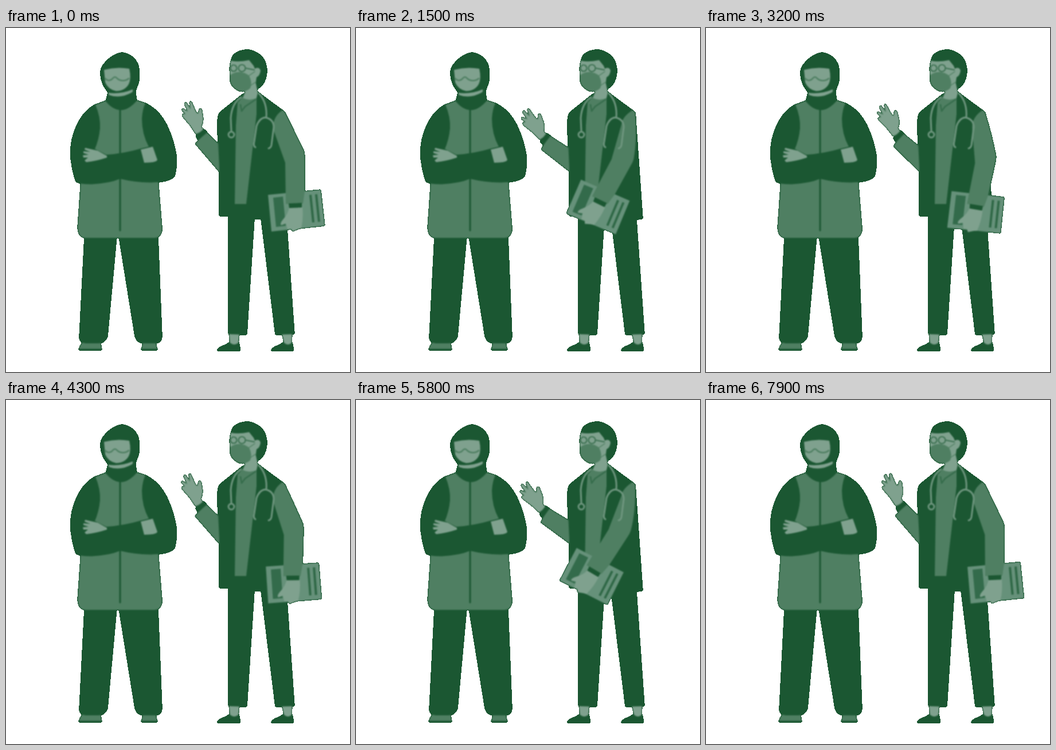
Recreate the animation shown at these times as an HTML page. Size 600x600 px, loop 8 s.

```html
<!DOCTYPE html>
<html lang="en">
<head>
<meta charset="utf-8">
<title>Two people talking</title>
<style>
  html, body { margin: 0; width: 100%; height: 100%; overflow: hidden; background: #fff; }
  svg { display: block; width: 100vw; height: 100vh; }
  .dark { fill: #1b5732; }
  .mid { fill: #4f7f62; }
  .light { fill: #7fa18e; }
  .book { fill: #66917a; }
  .line { fill: none; stroke-linecap: round; stroke-linejoin: round; }
</style>
</head>
<body>
<svg viewBox="0 0 600 600">
  <defs>
    <!-- soft colour edges inside a hard, slightly grown dark outline -->
    <filter id="soft" filterUnits="userSpaceOnUse" x="0" y="0" width="600" height="600" color-interpolation-filters="sRGB">
      <feGaussianBlur in="SourceAlpha" stdDeviation="0.8"/>
      <feComponentTransfer result="shape">
        <feFuncA type="discrete" tableValues="0 1 1 1"/>
      </feComponentTransfer>
      <feGaussianBlur in="SourceGraphic" stdDeviation="1" result="blur"/>
      <feFlood flood-color="#1b5732" result="base"/>
      <feMerge result="mix"><feMergeNode in="base"/><feMergeNode in="blur"/></feMerge>
      <feComposite in="mix" in2="shape" operator="in"/>
    </filter>
  </defs>

  <g filter="url(#soft)">
    <!-- shoes and trousers -->
    <path class="mid" d="M133 549H165L167 561H127Q128 555 133 549ZM239 549H261L264 561H236Z"/>
    <path class="dark" d="M127 559.5H167V562H127ZM236 559.5H264V562H236Z"/>
    <path class="dark" d="M137 364H193L177 538Q173 550 160 550H139Q128 549 128 540Z"/>
    <path class="dark" d="M197 364H265L272 538Q271 550 260 550H240Q228 549 225 538Z"/>
    <!-- coat -->
    <path class="mid" d="M131 262L125 348Q126 366 139 366H259Q273 365 272 348L265 262Z"/>
    <path class="dark" d="M157 133Q135 143 122 173Q108 205 115 241Q118 258 122 268Q130 273 150 272.500Q180 271 199 263Q232 271 262 269Q284 268 294 259Q299 240 297 222Q293 195 280 168Q266 141 243 131L227 126H177Z"/>
    <path class="mid" d="M156 134Q165 155 164 175Q162 195 155 211L175 221Q206 219 236 210L249 207Q237 185 237 158Q238 142 243 131L227 126Q200 159 174 127Z"/>
    <path class="line" d="M199 142V353" stroke="#1b5732" stroke-width="3"/>
    <!-- hands -->
    <path class="light" d="M176 223L160 214L138 209L137 212L147 216L135 215V218L144 221L134 222L135 226L143 226L137 231L140 234Q158 232 176 226Z"/>
    <path class="light" d="M235 212L256 207L264 230Q262 235 241 235Z"/>
    <!-- hood and face -->
    <path class="dark" d="M202 43C216 44 231 55 232 72Q234 90 230 99Q226 107 226 114L228 127Q200 159 174 128L178 112Q166 98 165 82Q164 72 169 65Q183 46 202 43Z"/>
    <path class="light" d="M171 73Q193 67 215 71Q219 88 214 98Q207 110 192 110Q178 107 173 95Z"/>
    <path class="line" d="M173 88C176 92 182 93 186 88Q190 83 194 88C199 93 209 93 214 88" stroke="#4f7f62" stroke-width="2.500"/>
    <path class="light" d="M178 113Q200 116 221 107Q222 110 220 112Q200 124 180 117Z"/>
  </g>

  <g filter="url(#soft)">
    <g id="wave">
      <path class="light" d="M331 185L321 170L310 157Q306 153 308 150L313 150L307 144Q306 140 309 140L317 146L311 133Q312 128 315 130L322 142L320 130Q321 126 324 129L330 143Q333 150 335 149L337 141Q341 139 342 144L344 158Q344 165 341 172L345 179Z"/>
      <path class="mid" d="M330 202L349 181L390 221V272Z"/>
      <path class="dark" d="M331 188L345 176L351 182L335 196Z"/>
    </g>
    <!-- feet -->
    <path class="light" d="M389 532H407L405 553H391ZM481 532H499L498 553H486Z"/>
    <path class="dark" d="M390 548Q398 556 406 548L409 563H368Q369 557 382 553ZM484 548Q492 556 499 548L502 563H462Q464 557 476 553Z"/>
    <!-- vest and trousers -->
    <path class="dark" d="M413 115L440 112L487 147L500 333L489 334L503 534L470 535L445 333H433L420 535L388 534V328H372V240L369 180Q368 152 373 147Z"/>
    <path class="mid" d="M404 130L414 119L437 120L437 150L419 307H399L401 170Z"/>
    <path class="line" d="M409 134L411 145L417 137L435 125" stroke="#356c4b" stroke-width="2.500"/>
    <!-- head -->
    <path class="light" d="M415 104L437 96L439 113L437 122Q425 128 413 122L417 112Z"/>
    <path class="dark" d="M393 58Q392 46 408 40Q425 35 437 43Q453 50 455 73Q455 97 438 107L428 60Z"/>
    <path class="light" d="M392 57Q405 60 424 56Q428 61 432 66L434 71Q441 67 444 74Q443 83 437 86L434 106Q418 112 404 108Q392 100 391 84L390 70Z"/>
    <path class="mid" d="M391 82Q407 71 424 83Q430 95 426 105Q417 113 407 110Q393 104 391 93Z"/>
    <path class="line" d="M424 83L434 76M427 100L436 94" stroke="#4f7f62" stroke-width="1.500"/>
    <g class="line" stroke="#3d7152" stroke-width="2.200">
      <circle cx="397" cy="70" r="5.500"/>
      <circle cx="411.500" cy="70" r="6"/>
      <path d="M418 70L433 73"/>
    </g>
    <!-- carried folder and arm -->
    <g class="carry">
      <path class="book" d="M457 291L549 282L556 345L463 355Z"/>
      <path d="M466 296L483 294L488 345L471 347Z" fill="#336b4b"/>
      <path class="line" d="M531 291L536 339M541 290L546 338" stroke="#2f6846" stroke-width="4" style="stroke-linecap:butt"/>
    </g>
    <path id="arm" class="mid"/>
    <g class="carry">
      <path class="light" d="M494 313L517 312Q519 332 515 349L509 351L500 355L497 350L491 351L488 341L480 344Q477 341 484 333Q492 324 494 313Z"/>
      <path class="dark" d="M493 306L516 305V313L494 314Z"/>
    </g>
    <!-- stethoscope -->
    <g class="line" stroke="#6f967f" stroke-width="3">
      <path d="M410 121Q394 131 392 157L393 180"/>
      <circle cx="393" cy="186" r="5"/>
      <path d="M441 114Q456 130 454 156"/>
      <path d="M435 208Q431 206 433 198L437 171Q442 157 452 156Q467 159 467 173L463 204Q462 209 458 210"/>
    </g>
  </g>
</svg>
<script>
  const LOOP = 8000, STEP = 100, SWING = 4020;
  const shoulder = [477.5, 167.3], elbow = [503, 225];
  const wave = document.getElementById('wave');
  const arm = document.getElementById('arm');
  const carried = document.querySelectorAll('.carry');

  function spin([x, y], [px, py], deg) {
    const a = deg * Math.PI / 180, c = Math.cos(a), s = Math.sin(a);
    return [px + (x - px) * c - (y - py) * s, py + (x - px) * s + (y - py) * c];
  }

  function draw(time) {
    const t = Math.floor(time % LOOP / STEP) * STEP;
    const k = (1 - Math.cos(2 * Math.PI * t / SWING)) / 2;
    const upper = 42 * k, lower = 34 * k;

    const joint = spin(elbow, shoulder, upper);
    const onUpper = (x, y) => spin([x, y], shoulder, upper);
    const onJoint = (dx, dy, deg) => spin([joint[0] + dx, joint[1] + dy], joint, deg);
    const bend = (upper + lower) / 2;

    arm.setAttribute('d', [
      'M', [483, 143], 'L', [487, 148],
      'Q', onUpper(504, 182), onJoint(16, -12, bend),
      'Q', onJoint(18, -7, bend), onJoint(18, 2, lower),
      'L', onJoint(18, 60, lower), onJoint(15, 81, lower), onJoint(-15, 82, lower),
      onJoint(-16, 10, bend), onUpper(466, 176),
      'Q', [465, 154], [483, 143], 'Z'
    ].join(' '));

    const move = `translate(${joint}) rotate(${lower}) translate(${-elbow[0]} ${-elbow[1]})`;
    carried.forEach(g => g.setAttribute('transform', move));
    wave.setAttribute('transform', `rotate(${-13.4 * k} 375 243)`);
  }

  const start = performance.now();
  function tick(now) {
    draw(Math.max(0, now - start));
    requestAnimationFrame(tick);
  }
  draw(0);
  requestAnimationFrame(tick);
</script>
</body>
</html>
```
